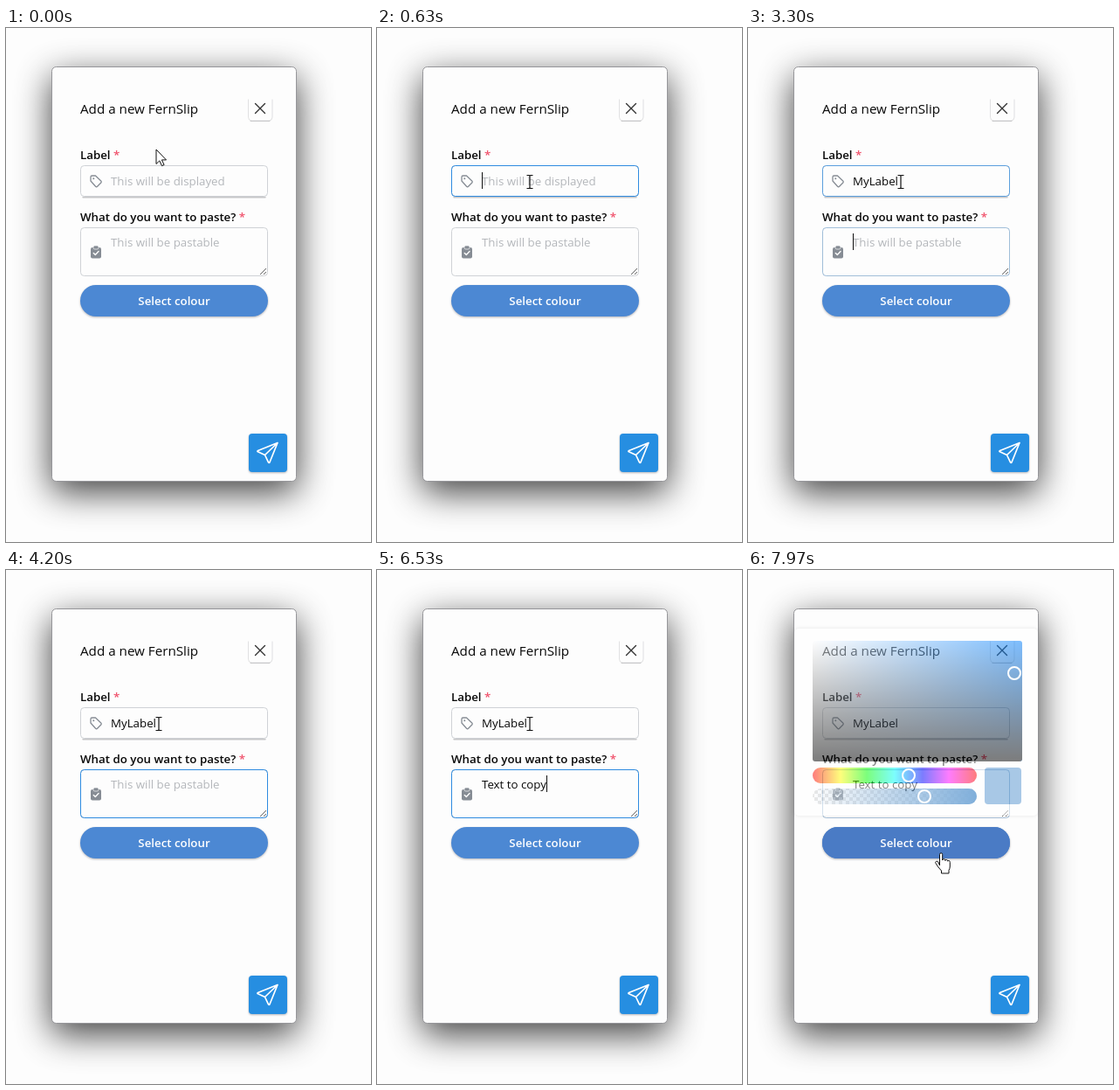
An HTML page for the animation above (8 s loop, 418x588 px).

```html
<!DOCTYPE html>
<html lang="en">
<head>
<meta charset="utf-8">
<title>Add form</title>
<style>
  html, body { margin: 0; width: 418px; height: 588px; overflow: hidden; background: #fdfdfd; }
  svg { display: block; }
  text { font: 13.3px "Open Sans", "Noto Sans", sans-serif; fill: #080808; white-space: pre; }
  .title { font-size: 15.2px; }
  .bold { font-weight: 600; }
  .hint { fill: #b4b7bb; }
  .star { fill: #f0506a; }
  .box { fill: none; stroke: #cfd2d6; }
  .focus { fill: none; stroke: #2e8be0; }
  .lift { fill: none; stroke: #c6c6c8; stroke-linecap: round; }
  .line { fill: none; stroke-linecap: round; stroke-linejoin: round; }
  .raised { filter: drop-shadow(0 1.5px 1px #b4b4b8); }
  .ring { fill: none; stroke: #fff; stroke-width: 2; }
</style>
</head>
<body>
<svg width="418" height="588" viewBox="0 0 418 588">
  <defs>
    <linearGradient id="tint">
      <stop stop-color="#fff"/><stop offset="1" stop-color="#007fff"/>
    </linearGradient>
    <linearGradient id="shade" x2="0" y2="1">
      <stop stop-opacity="0"/><stop offset="1"/>
    </linearGradient>
    <linearGradient id="hue">
      <stop stop-color="#f00"/><stop offset=".17" stop-color="#ff0"/><stop offset=".33" stop-color="#0f0"/>
      <stop offset=".5" stop-color="#0ff"/><stop offset=".67" stop-color="#00f"/>
      <stop offset=".83" stop-color="#f0f"/><stop offset="1" stop-color="#f00"/>
    </linearGradient>
    <linearGradient id="alpha">
      <stop stop-color="#0764ba" stop-opacity="0"/><stop offset="1" stop-color="#0764ba"/>
    </linearGradient>
    <pattern id="checker" width="8" height="8" patternUnits="userSpaceOnUse">
      <path d="M0 0h4v8h4v-4h-8z" fill="#d4d4d4"/>
    </pattern>
  </defs>

  <rect x="52" y="56" width="281" height="475" rx="5" opacity=".75" style="filter:blur(20px)"/>
  <rect x="52.5" y="44.5" width="280" height="474" rx="5" fill="#fdfdfd" stroke="#96969a"/>

  <text class="title" x="85" y="98">Add a new FernSlip</text>
  <path class="lift" d="M277.5 82V102q0 4 4 4H301q4 0 4-4V82" opacity=".5"/>
  <path class="lift" d="M280 106.5H302"/>
  <path class="line" d="M285.5 86.5l11 11m0-11l-11 11" stroke="#333" stroke-width="1.4"/>

  <text class="bold" x="85" y="150">Label <tspan class="star">*</tspan></text>
  <path class="lift" d="M88 193.7H297" stroke-width="1.5"/>
  <rect class="box" x="85.5" y="157.5" width="214" height="35" rx="4"/>
  <rect class="focus" id="focus0" x="85.5" y="157.5" width="214" height="35" rx="4"/>
  <path class="line" d="M97 170.5q0-1.5 1.5-1.5h4l6.3 6q1 1 0 2l-4.2 4.2q-1 1-2 0L97 175z" stroke="#868c94" stroke-width="1.3"/>
  <circle cx="100.3" cy="172.3" r="1" fill="#868c94"/>
  <text id="text0" x="120" y="180"></text>

  <text class="bold" x="85" y="221">What do you want to paste? <tspan class="star">*</tspan></text>
  <rect class="box" x="85.5" y="228.5" width="214" height="55" rx="4"/>
  <rect class="focus" id="focus1" x="85.5" y="228.5" width="214" height="55" rx="4"/>
  <path d="M291 282l7-7M295 282l3-3" stroke="#666"/>
  <rect x="97" y="251" width="12" height="12.5" rx="2" fill="#868c94"/>
  <rect x="100" y="249" width="6" height="4" rx="1.5" fill="#868c94" stroke="#fdfdfd" stroke-width=".7"/>
  <path class="line" d="M100.3 257.5l2 2 3.7-4" stroke="#fdfdfd" stroke-width="1.4"/>
  <text id="text1" x="120" y="250"></text>
  <rect id="caret" width="1" height="19" fill="#111"/>

  <g class="raised">
    <rect x="85" y="294" width="215" height="36" rx="18" fill="#4c88d3"/>
    <rect id="hover" x="85" y="294" width="215" height="36" rx="18" fill="#4a7bc5"/>
  </g>
  <text class="bold" x="192.5" y="317" text-anchor="middle" style="fill:#fff">Select colour</text>

  <rect class="raised" x="278" y="464" width="44" height="44" rx="4" fill="#268ee1"/>
  <path class="line" d="M311 474.5L288.5 483.5q-1.2.7 0 1.3L296.5 488.5l4 8.3q.8 1.2 1.5 0zL296.5 488.5" stroke="#fff" stroke-width="1.7"/>

  <g id="picker">
    <rect x="53" y="67" width="279" height="214" rx="5" fill="#fff" style="filter:drop-shadow(0 0 2px #0003)"/>
    <rect x="74" y="81" width="240" height="138" rx="3" fill="url(#tint)"/>
    <rect x="74" y="81" width="240" height="138" rx="3" fill="url(#shade)"/>
    <rect x="74" y="226" width="188" height="18" rx="9" fill="url(#hue)"/>
    <rect x="74" y="250" width="188" height="18" rx="9" fill="url(#checker)"/>
    <rect x="74" y="250" width="188" height="18" rx="9" fill="url(#alpha)"/>
    <rect x="271" y="226" width="42" height="42" rx="4" fill="#0764ba" fill-opacity=".68"/>
  </g>
  <g id="rings">
    <circle class="ring" cx="305" cy="118" r="7"/>
    <circle class="ring" cx="184" cy="235" r="7"/>
    <circle class="ring" cx="202" cy="259" r="7"/>
  </g>

  <g id="arrow"><path d="M0 0V16.5l3.8-3.6 2.7 5.8 2.6-1.2-2.7-5.6H11.5z" fill="#fff" stroke="#111"/></g>
  <g id="beam"><path d="M-3.5-7.5h2.5q1 0 1 1v13q0 1-1 1h-2.5M3.5-7.5h-2.5q-1 0-1 1v13q0 1 1 1h2.5" fill="none" stroke="#111" stroke-width="1.2"/></g>
  <g id="hand"><path d="M-1.5 14V1.5q0-1.7 1.6-1.7t1.6 1.7V8q.3-1.6 1.7-1.4t1.5 1.9q.4-1.3 1.6-1 1.3.3 1.3 1.7.5-1 1.5-.7 1 .4 1 1.9v4.6q0 2.5-1.3 4.5v3.5H.5v-3q-4-4-6.5-8.5-.8-1.5.4-2.1 1.5-.6 2.6.8z" fill="#fff" stroke="#111" stroke-linejoin="round"/></g>
</svg>
<script>
const LOOP = 8000, BLINK = 530, CLICK = 340, TAB = 3270, PICK = 7870;
const fields = [
  { value: "MyLabel", hint: "This will be displayed", top: 165, on: CLICK, off: TAB,
    keys: [1670, 1800, 2330, 2500, 2670, 2770, 2930] },
  { value: "Text to copy", hint: "This will be pastable", top: 235, on: TAB, off: PICK,
    keys: [4360, 4530, 4770, 4870, 5000, 5130, 5270, 5300, 5670, 6000, 6270, 6530] },
];
const $ = id => document.getElementById(id);
const ramp = (t, from, span) => Math.min(1, Math.max(0, (t - from) / span));
const smooth = x => x * x * (3 - 2 * x);
const easeOut = x => 1 - (1 - x) ** 2;
const fade = (id, v) => $(id).setAttribute("opacity", v);

function drawField(f, i, t) {
  const typed = f.keys.filter(k => k <= t);
  const el = $("text" + i);
  el.textContent = f.value.slice(0, typed.length) || f.hint;
  el.setAttribute("class", typed.length ? "" : "hint");
  fade("focus" + i, easeOut(ramp(t, f.on, 200)) * (1 - easeOut(ramp(t, f.off, 200))));
  if (t < f.on || t >= f.off) return;
  const last = typed.length ? typed[typed.length - 1] : f.on;
  const width = typed.length ? el.getSubStringLength(0, typed.length) : 0;
  $("caret").setAttribute("x", Math.round(120 + width));
  $("caret").setAttribute("y", f.top);
  fade("caret", Math.floor((t - last) / BLINK) % 2 ? 0 : 1);
}

function drawPointer(t) {
  const a = smooth(ramp(t, 0, 300)), b = smooth(ramp(t, 7380, 450));
  const x = 172 + 3 * a + 46 * b, y = 139 + 37 * a + 148 * b;
  const inField = (y > 157 && y < 193) || (y > 228 && y < 284);
  const shape = y > 294 ? "hand" : inField ? "beam" : "arrow";
  for (const id of ["arrow", "beam", "hand"]) fade(id, id === shape ? 1 : 0);
  $(shape).setAttribute("transform", `translate(${x} ${y})`);
  fade("hover", ramp(y, 294, 20));
}

function draw(now) {
  const t = now % LOOP;
  fade("caret", 0);
  fields.forEach((f, i) => drawField(f, i, t));
  drawPointer(t);
  fade("picker", ramp(t, PICK, 200));
  fade("rings", ramp(t, PICK, 100));
  requestAnimationFrame(draw);
}
requestAnimationFrame(draw);
</script>
</body>
</html>
```
